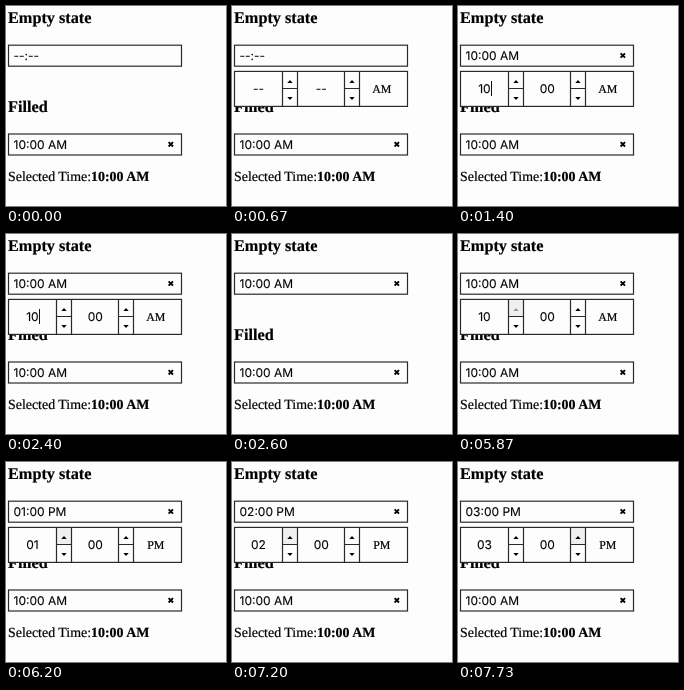
Animation of 220x200 px, one loop 8000 ms. Source, as an HTML page:

```html
<!DOCTYPE html>
<html lang="en">
<head>
<meta charset="utf-8">
<title>Time picker</title>
<style>
  html, body { margin: 0; width: 100%; height: 100%; overflow: hidden; background: #fefdfe; }
  svg { display: block; width: 220px; height: 200px; text-rendering: geometricPrecision; }
  text { font: 13.92px "Liberation Serif", Times, serif; fill: #000; stroke: #000; stroke-width: .2; white-space: pre; }
  .heading { font-size: 16.25px; font-weight: bold; }
  .bold { font-weight: bold; }
  .field { font: 12px Inter, "Liberation Sans", sans-serif; stroke-width: .1; }
  .mid { text-anchor: middle; }
  .period { font-size: 11.9px; }
  .box { fill: #fefdfe; }
  .box, .line { stroke: #2a2a2a; stroke-width: 1.2; }
  .line { fill: none; }
  .cross { fill: none; stroke: #000; stroke-width: 1.9; }
</style>
</head>
<body>
<svg viewBox="0 0 220 200">
  <defs><path id="cross" class="cross" d="M162.6 47.3l4.4 4.4m0-4.4l-4.4 4.4"/></defs>

  <text class="heading" x="2" y="17.4">Empty state</text>
  <rect class="box" x="2.5" y="39.2" width="173" height="21"/>
  <text class="field" id="value" x="7.5" y="53.9"></text>
  <use id="clear" href="#cross"/>

  <text class="heading" x="2" y="106.4">Filled</text>
  <rect class="box" x="2.5" y="128" width="173" height="21"/>
  <text class="field" x="7.5" y="142.8">10:00 AM</text>
  <use href="#cross" y="88.8"/>
  <text x="2" y="175.4">Selected Time:<tspan class="bold">10:00 AM</tspan></text>

  <g id="panel">
    <rect class="box" x="2.5" y="65.4" width="173" height="35"/>
    <rect id="hourHover" x="51" y="66" width="14" height="16" fill="#efeff0"/>
    <rect id="minuteHover" x="113" y="66" width="14" height="16" fill="#efeff0"/>
    <path class="line" d="M50.5 65.5v35M65.5 65.5v35M112.5 65.5v35M127.5 65.5v35M50.5 82.5h15M112.5 82.5h15"/>
    <path id="hourUp" d="M55.3 77l2.7-3 2.7 3z"/>
    <path d="M55.3 91l2.7 3 2.7-3zM117.3 77l2.7-3 2.7 3zM117.3 91l2.7 3 2.7-3z"/>
    <rect id="selection" x="20" y="75" width="13.5" height="15.5" fill="#b3d7fc"/>
    <text class="field mid" id="hour" x="26.4" y="87.3"></text>
    <text class="field mid" id="minute" x="89.3" y="87.3"></text>
    <text class="period mid" id="period" x="149.8" y="86.7"></text>
    <rect id="caret" y="75" width="1" height="15" fill="#111"/>
  </g>
</svg>
<script>
const LOOP = 8000;
const el = id => document.getElementById(id);
const show = (id, on) => el(id).setAttribute("visibility", on ? "inherit" : "hidden");
const within = (t, from, to) => t >= from && t < to;

const TYPED = 1400;
const clicks = [5930, 6070, 6200, 7200, 7330];

function setText(id, text) {
  if (el(id).textContent !== text) el(id).textContent = text;
}

function render(t) {
  const filled = t >= TYPED;
  const hours = 10 + clicks.filter(c => t >= c).length;
  const hour = String((hours - 1) % 12 + 1).padStart(2, "0");
  const period = hours >= 12 ? "PM" : "AM";

  setText("value", filled ? `${hour}:00 ${period}` : "--:--");
  setText("hour", filled ? hour : "--");
  setText("minute", filled ? "00" : "--");
  setText("period", period);
  show("clear", filled);

  show("panel", within(t, 70, 2600) || t >= 4000);
  show("selection", within(t, 4000, 4200));

  const blinkOff = within(t, 670, 1200) || within(t, 1930, 2400);
  show("caret", within(t, 200, 2600) && !blinkOff);
  el("caret").setAttribute("x", filled ? 33 : 26.5);

  show("hourHover", within(t, 5400, 7730));
  show("minuteHover", t >= 7730);
  el("hourUp").setAttribute("fill", within(t, 5870, 5930) ? "#999" : "#000");
}

const start = performance.now();
function tick() {
  render((performance.now() - start) % LOOP);
  requestAnimationFrame(tick);
}
tick();
</script>
</body>
</html>
```
